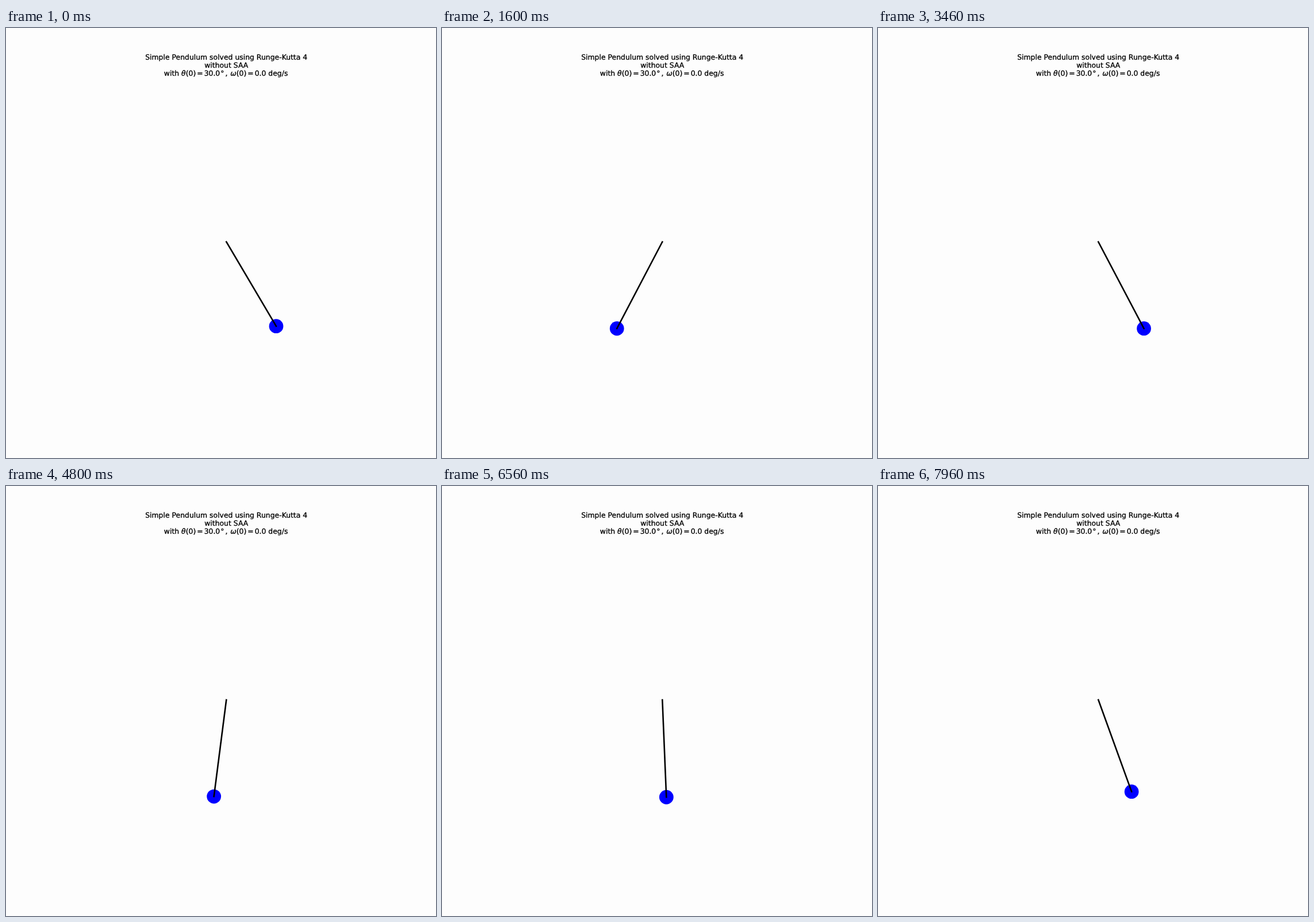
Animation, 748 px wide and 748 px high, one loop 8000 ms. Source, as an HTML page:

```html
<!DOCTYPE html>
<html lang="en">
<head>
<meta charset="utf-8">
<title>Simple Pendulum</title>
<style>
  html, body { margin: 0; width: 100%; height: 100%; overflow: hidden; background: #fdfdfd; }
  svg { display: block; width: 100%; height: 100%; }
  text {
    font: 12.42px "DejaVu Sans", sans-serif;
    text-rendering: geometricPrecision;
    stroke: #000;
    stroke-width: .3px;
  }
  .mid { text-anchor: middle; }
  .var { font-style: italic; }
</style>
</head>
<body>
<svg viewBox="0 0 748 748">
  <text class="mid" x="383.2" y="55.3">Simple Pendulum solved using Runge-Kutta 4</text>
  <text class="mid" x="383.2" y="69">without SAA</text>
  <text x="274.8" y="82.8">with <tspan class="var">θ</tspan>(0)<tspan dx="2">=</tspan><tspan dx="2">30.0</tspan><tspan dx="1">°</tspan><tspan dx="2">,</tspan><tspan class="var" x="390.3">ω</tspan>(0)<tspan dx="2">=</tspan><tspan dx="2">0.0 deg/s</tspan></text>
  <circle id="bob" r="12.4" fill="#00f"/>
  <line id="rod" stroke="#000" stroke-width="2.6" stroke-linecap="square"/>
</svg>
<script>
  const LOOP = 8000, FPS = 30, PERIOD = 3.7263;
  const START = Math.PI / 6;
  const pivot = { x: 383.3, y: 372 };
  const reach = { x: 173.4, y: 169.4 };
  const bob = document.getElementById("bob");
  const rod = document.getElementById("rod");

  const set = (node, attrs) => {
    for (const name in attrs) node.setAttribute(name, attrs[name]);
  };

  // Large-angle swing: fundamental plus the third-harmonic correction.
  function angleAt(seconds) {
    const phase = 2 * Math.PI * seconds / PERIOD;
    const base = Math.cos(phase);
    return START * base + START ** 3 / 192 * (base - Math.cos(3 * phase));
  }

  function draw(ms) {
    // Steps of 1/30 s, with each start time rounded down to 10 ms.
    const tick = Math.floor(ms / 10) * 10;
    const step = Math.floor((tick + 7) * FPS / 1000);
    const angle = angleAt(step / FPS);
    const x = pivot.x + reach.x * Math.sin(angle);
    const y = pivot.y + reach.y * Math.cos(angle);
    set(bob, { cx: x, cy: y });
    set(rod, { x1: pivot.x, y1: pivot.y, x2: x, y2: y });
  }

  const begin = performance.now();
  function frame() {
    draw((performance.now() - begin) % LOOP);
    requestAnimationFrame(frame);
  }
  frame();
</script>
</body>
</html>
```
